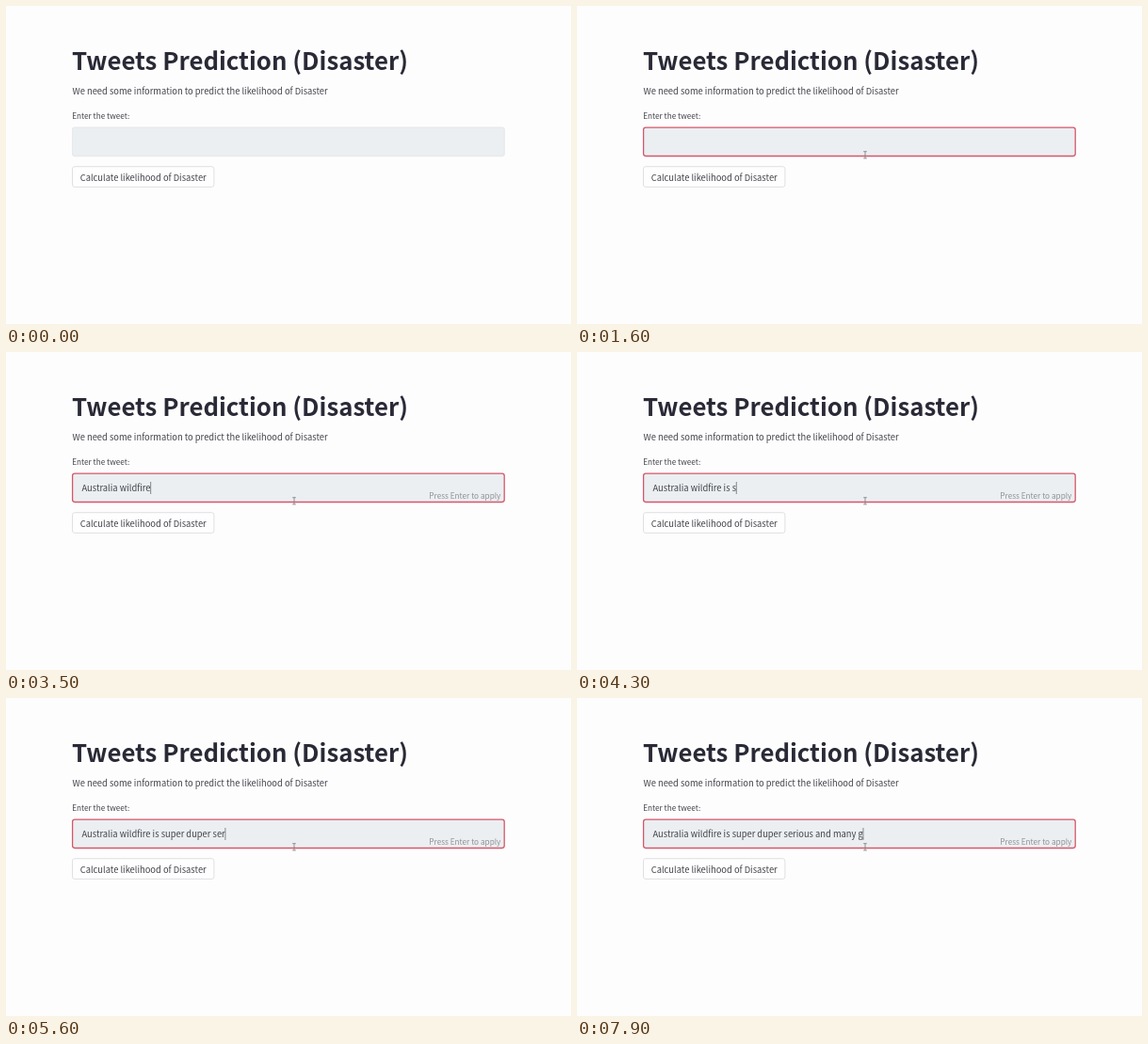
Write an HTML page that moves like this. It is 600 by 338 pixels and loops after 8000 ms.

```html
<!DOCTYPE html>
<html lang="en">
<head>
<meta charset="utf-8">
<title>Tweets Prediction</title>
<style>
  html, body { margin: 0; width: 100%; height: 100%; overflow: hidden; background: #fefdfe; }
  svg { display: block; width: 100vw; height: 100vh; }
  text {
    font: 9.35px "Noto Sans CJK JP", "Noto Sans CJK SC", "Noto Sans CJK KR", "Noto Sans CJK TC", "Noto Sans CJK", "Open Sans", sans-serif;
    fill: #42434a;
    white-space: pre;
  }
  .title { font-size: 25.8px; font-weight: 700; fill: #292a36; }
  .small { font-size: 8.22px; }
  .hint { fill: #8e9197; text-anchor: end; }
</style>
</head>
<body>
<svg viewBox="0 0 600 338">
  <text class="title" x="70" y="68">Tweets Prediction (Disaster)</text>
  <text x="70.5" y="94">We need some information to predict the likelihood of Disaster</text>
  <text class="small" x="70.2" y="120">Enter the tweet:</text>

  <rect id="field" x="70.6" y="129.1" width="458.6" height="30.4" rx="2.4" fill="#ebeff1" stroke="#e6eaec" stroke-width="1.3"/>
  <text id="typed" x="80.5" y="148"></text>
  <rect id="caret" y="138" width=".8" height="13" fill="#6a6c72"/>
  <text id="hint" class="small hint" x="525.4" y="156">Press Enter to apply</text>

  <rect x="70.5" y="170.7" width="150.4" height="21.7" rx="2.4" fill="#fefefe" stroke="#dddde0" stroke-width=".9"/>
  <text x="78.7" y="186">Calculate likelihood of Disaster</text>

  <g id="pointer">
    <path id="arrow" d="M0 0v9l2.1-2 1.4 3.2 1.3-.6-1.4-3.1h2.8z" fill="#fff" stroke="#444" stroke-width=".6"/>
    <path id="beam" d="M-1.8-3.6h3.6M0-3.6v7.2M-1.8 3.6h3.6" fill="none" stroke="#777b80" stroke-width=".8"/>
  </g>
</svg>
<script>
const LOOP = 8000;
const BLINK = 530;
const FOCUS = 1300;
const MESSAGE = "Australia wildfire is super duper serious and many g";

// Typing bursts: start, end, letters after the first key, letters after the last key
const BURSTS = [
  [1980, 3250, 1, 18],
  [3980, 4780, 19, 30],
  [4980, 5780, 31, 39],
  [6580, 6680, 40, 41],
  [6880, 7380, 42, 47],
  [7480, 7580, 49, 50],
  [7780, 7880, 51, 52],
];

const el = id => document.getElementById(id);
const [field, typed, caret, hint, pointer, arrow, beam] =
  ["field", "typed", "caret", "hint", "pointer", "arrow", "beam"].map(el);
const show = (node, on) => node.setAttribute("visibility", on ? "visible" : "hidden");
const clamp = v => Math.min(1, Math.max(0, v));

function drawTyping(t) {
  const burst = BURSTS.filter(([start]) => start <= t).pop();
  let count = 0;
  let caretOn = false;
  if (burst) {
    const [start, end, first, last] = burst;
    count = first + Math.floor(clamp((t - start) / (end - start)) * (last - first));
    caretOn = Math.max(0, t - end) % (2 * BLINK) < BLINK;
  }
  typed.textContent = MESSAGE.slice(0, count);
  caret.setAttribute("x", 80.3 + (count ? typed.getComputedTextLength() : 0));
  show(caret, caretOn);
  show(hint, count > 0);
}

function drawPointer(t) {
  const p = clamp((t - 980) / 280);
  const ease = 1 - (1 - p) ** 2;
  const x = 318 - 12 * ease;
  const y = 200 - 41.7 * ease;
  const visible = t >= 980;
  pointer.setAttribute("transform", `translate(${x} ${y})`);
  show(arrow, visible && y > 160);
  show(beam, visible && y <= 160);
}

function draw() {
  const t = (performance.now() - began) % LOOP;
  field.setAttribute("stroke", t >= FOCUS ? "#d5566a" : "#e6eaec");
  drawTyping(t);
  drawPointer(t);
  requestAnimationFrame(draw);
}

const began = performance.now();
draw();
</script>
</body>
</html>
```
